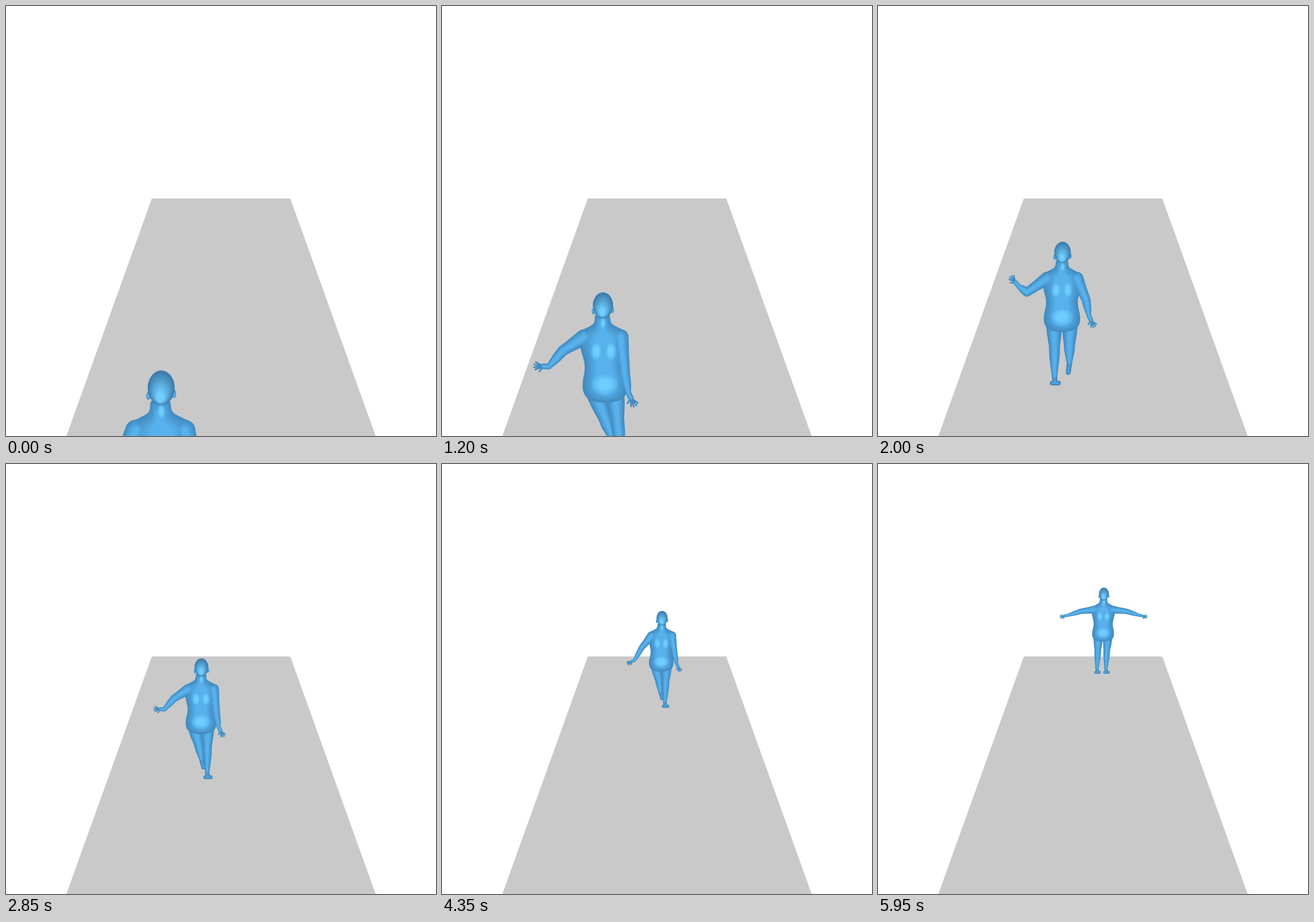
Write an HTML page with a canvas that moves like this. It is 748x748 px and loops after 6000 ms.

```html
<!DOCTYPE html>
<html lang="en">
<head>
<meta charset="utf-8">
<title>Walking figure</title>
<style>
  html, body { margin: 0; width: 100%; height: 100%; overflow: hidden; background: #fff; }
  canvas { display: block; }
</style>
</head>
<body>
<canvas id="stage" width="748" height="748"></canvas>
<script>
const ctx = document.getElementById('stage').getContext('2d');
const LOOP = 6000, TICK = 50;
const DARK = [62, 126, 173], EDGE = [66, 140, 192], MID = [80, 164, 220],
  SOFT = [88, 177, 236], LIGHT = [111, 205, 255];

const mix = (a, b, u) => a + (b - a) * u;
const mixAll = (p, q, u) => p.map((v, i) => mix(v, q[i], u));
const clamp = u => Math.min(1, Math.max(0, u));

// smooth step from 0 at time a to 1 at time b
function ramp(t, a, b) {
  const u = clamp((t - a) / (b - a));
  return u * u * (3 - 2 * u);
}

// smooth curve through a few keyed points, at rest at both ends
function at(keys, t) {
  const last = keys.length - 1;
  if (t >= keys[last][0]) return keys[last].slice(1);
  const i = keys.findIndex((k, n) => n < last && t < keys[n + 1][0]);
  const a = keys[i], b = keys[i + 1], span = b[0] - a[0], u = (t - a[0]) / span, w = 1 - u;
  const slope = (n, c) => n <= 0 || n >= last ? 0 :
    (keys[n + 1][c] - keys[n - 1][c]) / (keys[n + 1][0] - keys[n - 1][0]);
  return a.slice(1).map((v, j) => v * (1 + 2 * u) * w * w + b[j + 1] * u * u * (3 - 2 * u)
    + span * u * w * (slope(i, j + 1) * w - slope(i + 1, j + 1) * u));
}

// time, head x, part of the way walked
const path = [
  [0, 270, 0], [600, 268, .03], [1200, 280, .195], [2000, 321, .367],
  [2850, 340, .548], [3650, 369, .708], [5050, 392, .926], [5950, 393, 1]
];
// phase, then height of knee, ankle and toe below the head top
const gait = [
  [0, 180, 235, 246], [.65, 184, 248, 262], [1, 178, 209, 226],
  [1.65, 178, 226, 238], [2, 180, 235, 246]
];
// height below the head top and half width of the trunk
const trunk = [
  [30, 11], [42, 11], [47, 15], [54, 31], [67, 35], [84, 32],
  [106, 26], [132, 33], [150, 29], [157, 12]
];

// counts steps: the left foot carries at even values, the right one at odd ones
const stepPhase = t => (t - 3650) / (t < 3650 ? 812 : 700);

// fills nested copies of all shapes, colour by colour from the rim inwards
function paint(shapes, from, to, count = 5) {
  for (let k = 0; k < count; k++) {
    const u = k / (count - 1);
    ctx.fillStyle = `rgb(${mixAll(from, to, u).map(Math.round)})`;
    ctx.beginPath();
    for (const shape of shapes) shape(u);
    ctx.fill();
  }
}

function oval(x, y, rx, ry) {
  ctx.moveTo(x + rx, y);
  ctx.ellipse(x, y, rx, ry, 0, 0, 2 * Math.PI);
}

const tube = (points, radii) => u => {
  for (let i = 0; i < points.length - 1; i++)
    for (let n = 0; n <= 14; n++) {
      const [x, y] = mixAll(points[i], points[i + 1], n / 14);
      const r = mix(radii[i], radii[i + 1], n / 14) * (1 - .72 * u);
      oval(x, y, r, r);
    }
};

const glow = (x, y, rx, ry) =>
  paint([u => oval(x, y, rx * (1 - .5 * u), ry * (1 - .5 * u))], SOFT, LIGHT);

function ground() {
  ctx.fillStyle = '#fff';
  ctx.fillRect(0, 0, 748, 748);
  ctx.fillStyle = '#c9c9c9';
  ctx.beginPath();
  ctx.moveTo(253.7, 334.7);
  ctx.lineTo(494.5, 334.7);
  ctx.lineTo(643, 748);
  ctx.lineTo(105, 748);
  ctx.fill();
}

function leg(side, t, lean) {
  const step = stepPhase(t) + (side > 0 ? 1 : 0);
  const phase = (step % 2 + 2) % 2;
  const stride = ramp(t, 300, 800) * (1 - ramp(t, 5200, 5700));
  const [ky, ay, ty] = mixAll(gait[0].slice(1), at(gait, phase), stride);
  const swing = Math.max(0, -Math.cos(Math.PI * phase)) * stride;
  const shift = lean + (side < 0 ? 14 * swing : 0);
  const hip = [side * 14 - 1 + lean * .25, 141];
  const knee = [side * 13 - 1 + shift * .6, ky];
  const ankle = [side * 13 - 1 + shift, ay];
  const toe = [ankle[0] + 1 - 3 * side * swing, ty];
  const flat = clamp((17 - (ty - ay)) / 6);
  const sole = [[toe[0] - 5 * flat, ty], [toe[0] + 6 * flat, ty]];
  paint([tube([ankle, toe], [4.8, 4.2]), tube(sole, [4, 4])], DARK, MID);
  paint([tube([hip, mixAll(hip, knee, .5), knee, mixAll(knee, ankle, .35), ankle],
    [14, 12.5, 9.8, 9.2, 4.8])], EDGE, SOFT);
}

// elbow and wrist, as [x, y, x, y]
function armPose(side, t, lift) {
  const sway = Math.cos(Math.PI * stepPhase(t));
  const droop = ramp(t, 2900, 3600), wave = Math.exp(-(((t - 2000) / 350) ** 2));
  const hang = [side * 38 - 4, 92, side * 45 - 4, 125];
  const raised = [-57 - 5 * wave, 83 + 12 * droop + 5 * wave, -77 - 5 * droop, 106 + 22 * droop - 29 * wave];
  const swung = [36 + 5 * sway, 109 - 8 * sway, 41 + 5 * sway, 136 - 7 * sway];
  const walking = mixAll(hang, side < 0 ? raised : swung, lift);
  return mixAll(walking, [side * 66 - 1, 69, side * 105 - 1, 81], ramp(t, 5100, 5750));
}

function arm(side, t) {
  const lift = ramp(t, 200, 750) * (1 - ramp(t, 3900, 5050));
  const [ex, ey, wx, wy] = armPose(side, t, lift);
  const shoulder = [side * 26 - 1, 64], elbow = [ex, ey], wrist = [wx, wy];
  const cock = side < 0 ? 25 * lift : 0;
  const angle = Math.atan2(wy - ey - cock, (wx - ex) * 1.5 + side * 6);
  const along = (p, length, turn = 0) =>
    [p[0] + length * Math.cos(angle + turn), p[1] + length * Math.sin(angle + turn)];
  const palm = along(wrist, 8);
  ctx.lineCap = 'round';
  ctx.lineWidth = 2.4;
  ctx.strokeStyle = `rgb(${EDGE})`;
  ctx.beginPath();
  for (let turn = -.45; turn < .5; turn += .3) {
    ctx.moveTo(...palm);
    ctx.lineTo(...along(palm, 14 - 4 * Math.abs(turn), turn));
  }
  ctx.moveTo(...palm);
  ctx.lineTo(...along(palm, 9, side));
  ctx.stroke();
  return tube([shoulder, mixAll(shoulder, elbow, .5), elbow, mixAll(elbow, wrist, .45), wrist, palm],
    [11.5, 9.2, 7.8, 6.8, 4, 4]);
}

function upperBody(t, lean) {
  const axis = y => -1 + lean * .25 * (y - 30) / 100;
  const edge = side => trunk.map(([y, w]) => [y, side * w]);
  const torso = u => {
    const pts = [...edge(1), ...edge(-1).reverse()].map(([y, w]) =>
      [axis(y) + w * (1 - .6 * u), 98 + (y - 98) * (1 - .2 * u)]);
    const n = pts.length;
    ctx.moveTo(...mixAll(pts[n - 1], pts[0], .5));
    pts.forEach((p, i) => ctx.quadraticCurveTo(...p, ...mixAll(p, pts[(i + 1) % n], .5)));
  };
  paint([torso, arm(-1, t), arm(1, t)], EDGE, SOFT, 6);
  for (const side of [-1, 1]) glow(axis(84) + side * 10, 84, 8, 14);
  glow(axis(131), 131, 19, 16);
  glow(0, 44, 4, 8);
}

function head() {
  const ear = side => u => oval(side * 13.6, 26 - side, 2.3 - u, 4.4 - 2 * u);
  paint([ear(-1), ear(1)], EDGE, SOFT, 3);
  paint([u => oval(-u, mix(18.5, 28, u), mix(14.4, 4, u), mix(18.5, 6, u))], DARK, LIGHT, 7);
}

function render(t) {
  const [x, way] = at(path, t);
  const y = 863.5 / (way + 1.02) - 212.6, scale = 1 / (.613 + 1.054 * way);
  const lean = 14 * (1 - ramp(t, 1200, 2000)) - 6 * ramp(t, 3000, 5000);
  ground();
  ctx.save();
  ctx.translate(x, y);
  ctx.scale(scale, scale);
  leg(-1, t, lean);
  leg(1, t, lean);
  upperBody(t, lean);
  head();
  ctx.restore();
}

const start = performance.now();
function frame() {
  const t = (performance.now() - start) % LOOP;
  render(Math.floor(t / TICK) * TICK);
  requestAnimationFrame(frame);
}
frame();
</script>
</body>
</html>
```
